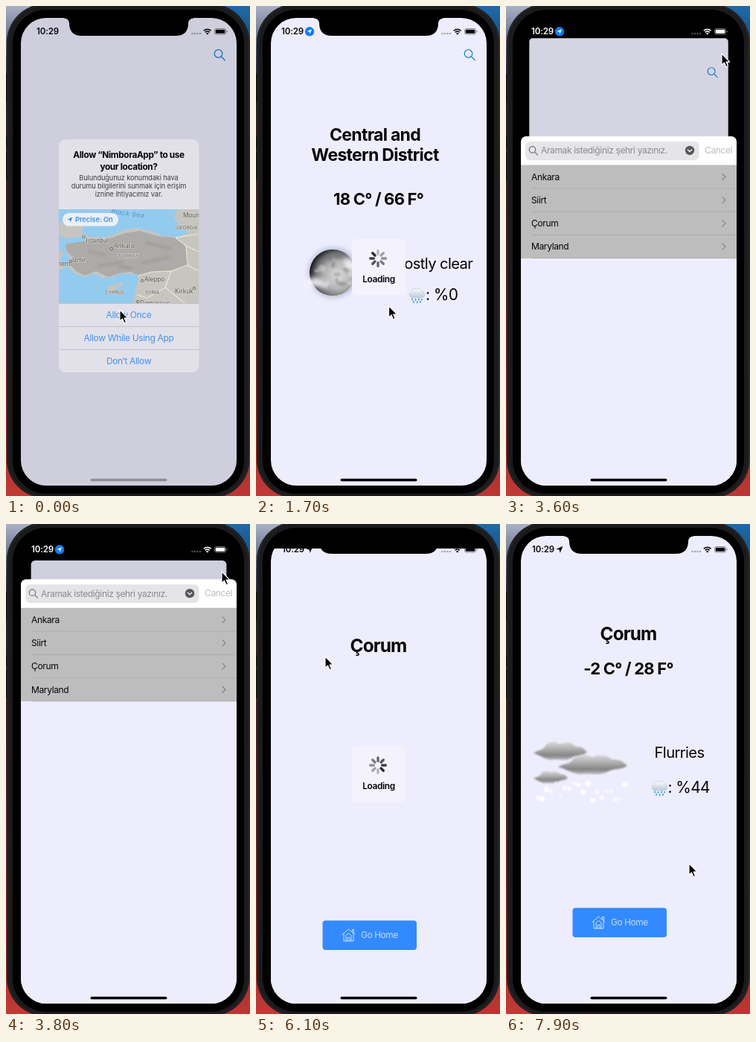
An HTML page for the animation above (8 s loop, 328x658 px).

```html
<!DOCTYPE html>
<html lang="en">
<head>
<meta charset="utf-8">
<title>Weather app</title>
<style>
  html, body { margin: 0; width: 100%; height: 100%; overflow: hidden; background: #000; }
  svg { display: block; }
  text { font-family: Inter, Roboto, sans-serif; letter-spacing: -.03em; fill: #050507; }
  .mid { text-anchor: middle; }
  .bold { font-weight: 700; letter-spacing: -.035em; }
  .t12 { font-size: 12px; }
  .t20 { font-size: 20.2px; }
  .msg { font-size: 9.2px; letter-spacing: -.01em; fill: #3c3b42; }
  .act { font-size: 12px; fill: #4292ee; }
  .map text { font-size: 8.3px; fill: #55544f; letter-spacing: -.01em; paint-order: stroke; stroke: #dcdbd5; stroke-width: 1.2px; }
  .map .land { font-size: 6.4px; fill: #7c7a76; font-weight: 600; }
  .line { fill: none; stroke-linecap: round; stroke-linejoin: round; }
</style>
</head>
<body>
<svg width="328" height="658" viewBox="0 0 328 658">
  <defs>
    <linearGradient id="desk" x2="0" y2="1">
      <stop offset="0" stop-color="#a9b1c6"/><stop offset=".1" stop-color="#46506a"/>
      <stop offset=".16" stop-color="#26222a"/><stop offset=".35" stop-color="#4a2423"/>
      <stop offset=".8" stop-color="#8e2b2a"/><stop offset="1" stop-color="#c23a36"/>
    </linearGradient>
    <linearGradient id="deskR" x2="0" y2="1">
      <stop offset="0" stop-color="#1f6aa8"/><stop offset=".12" stop-color="#163c63"/>
      <stop offset=".5" stop-color="#2a2027"/><stop offset="1" stop-color="#bd3633"/>
    </linearGradient>
    <radialGradient id="moon" cx=".62" cy=".56" r=".62">
      <stop offset="0" stop-color="#dedede"/><stop offset=".5" stop-color="#b0b0b1"/>
      <stop offset=".8" stop-color="#6a6a6d"/><stop offset="1" stop-color="#1d1d20"/>
    </radialGradient>
    <linearGradient id="grey" x2="0" y2="1">
      <stop offset="0" stop-color="#dcdcdf"/><stop offset=".45" stop-color="#aaa9a9"/>
      <stop offset=".75" stop-color="#858483"/><stop offset="1" stop-color="#bdbcc0"/>
    </linearGradient>
    <linearGradient id="rainSky" x2="0" y2="1">
      <stop offset="0" stop-color="#fbfdff"/><stop offset="1" stop-color="#bccbd8"/>
    </linearGradient>
    <filter id="soft1" x="-20%" y="-30%" width="140%" height="160%"><feGaussianBlur stdDeviation="1"/></filter>
    <filter id="soft3" x="-40%" y="-40%" width="180%" height="180%"><feGaussianBlur stdDeviation="3"/></filter>
    <clipPath id="screen"><rect x="20" y="16" width="290" height="628" rx="34"/></clipPath>
    <clipPath id="mapBox"><rect x="71" y="273" width="188.500" height="126"/></clipPath>
    <clipPath id="disc"><circle cx="103" cy="358" r="31"/></clipPath>
    <path id="puff" d="M0 24C8 18 14 20 20 14C26 2 40 0 50 8C58 2 72 4 78 12C90 10 96 18 100 22C92 30 80 26 72 32C60 40 46 34 36 36C24 38 14 28 0 24Z"/>
    <g id="lens" class="line"><circle r="5.300"/><path d="M4 4L8.700 8.700"/></g>
    <path id="plane" d="M4.500 -4.500L-4.600 -.6L-.2 .2L.6 4.600Z"/>
    <g id="rain">
      <path d="M4 13.500A4.500 4.500 0 0 1 3.800 5.200A5 5 0 0 1 11 2.200A5 5 0 0 1 18.500 5.600A4 4 0 0 1 18 13.500Z" fill="url(#rainSky)" stroke="#b5c3d0" stroke-width=".6"/>
      <path d="M5 15v1.500M9.500 15.500v1.500M14 15v1.500M18 15.500v1M7 18.500v1.500M11.800 19v1.500M16 18.500v1.500" class="line" stroke="#3d9fe0" stroke-width="1.700"/>
    </g>
  </defs>

  <rect width="164" height="658" fill="url(#desk)"/>
  <rect x="164" width="164" height="658" fill="url(#deskR)"/>
  <rect x="1" y="-3" width="326.500" height="664" rx="52" fill="#1b1b1d"/>
  <rect x="2.500" y="-1.500" width="323.500" height="661" rx="51" fill="none" stroke="#2b2b2e"/>
  <rect x="9" y="5" width="311" height="650" rx="45" fill="#000"/>
  <path d="M0 91h2v38h-2zM0 176h2v16h-2zM0 196h2v38h-2z" fill="#141416"/>

  <g clip-path="url(#screen)">
    <rect x="20" y="16" width="290" height="628" fill="#000"/>

    <g id="home">
      <rect id="homeBg" x="20" y="16" width="290" height="640" fill="#eeedfd"/>
      <use href="#lens" x="285.500" y="64" stroke="#1583de" stroke-width="1.300"/>
      <g id="place" class="bold" font-size="23">
        <text class="mid" x="160" y="181">Central and</text>
        <text class="mid" x="160" y="208">Western District</text>
      </g>
      <g id="homeData">
        <text class="mid bold" x="164.500" y="267" font-size="22">18 C° / 66 F°</text>
        <circle cx="104" cy="358" r="34" fill="#8b95b5" opacity=".5" filter="url(#soft3)"/>
        <circle cx="103" cy="358" r="31" fill="url(#moon)"/>
        <g clip-path="url(#disc)"><g id="craters" filter="url(#soft1)"></g></g>
        <g fill="#f6f6fb" filter="url(#soft3)" opacity=".9">
          <ellipse cx="78" cy="371" rx="13" ry="6"/><ellipse cx="134" cy="350" rx="12" ry="6"/>
          <ellipse cx="124" cy="344" rx="7" ry="5"/><ellipse cx="92" cy="374" rx="8" ry="4"/>
        </g>
        <text class="mid t20" x="236.500" y="352.500">Mostly clear</text>
        <use href="#rain" x="205" y="378"/>
        <text x="228" y="395" font-size="21">: %0</text>
      </g>
    </g>
    <rect id="dim" x="20" y="16" width="290" height="628" fill="#000"/>

    <g id="alert">
      <rect x="71" y="179" width="188.500" height="313" rx="9" fill="#e2e1ea"/>
      <g class="bold mid" font-size="11.800" fill="#111">
        <text x="165" y="204.300">Allow “NimboraApp” to use</text>
        <text x="165" y="219.500">your location?</text>
      </g>
      <text class="mid msg" x="165" y="234">Bulunduğunuz konumdaki hava</text>
      <text class="mid msg" x="165" y="245">durumu bilgilerini sunmak için erişim</text>
      <text class="mid msg" x="165" y="256">iznine ihtiyacımız var.</text>
      <g class="map" clip-path="url(#mapBox)">
        <rect x="71" y="273" width="189" height="126" fill="#c6c5bf"/>
        <path d="M71 273H230L226 283L232 296L246 304L232 310L212 309L194 302L176 298L160 300L148 306L130 311L112 310L102 304L104 296L95 288L71 292Z" fill="#93cbef"/>
        <path d="M71 309L84 312L103 309L110 314L98 318L84 319L80 330L87 340L83 350L92 359L106 364L118 359L130 365L144 364L154 359L168 360L175 357L178 368L174 380L171 399H71Z" fill="#93cbef"/>
        <path d="M80 320L90 318L112 315L134 314L160 305L180 302L204 309L228 311L242 322L244 348L222 356L196 357L178 362L168 357L152 359L138 364L121 356L106 362L94 356L85 346L90 338L82 330Z" fill="#adaba8"/>
        <path d="M134 378L146 374L158 371L153 378L140 383ZM71 326L78 332L73 340L79 352L71 356Z" fill="#c6c5bf"/>
        <path d="M178 362L196 357L222 356L244 348L259 356M244 348L242 322L228 311L259 306M242 322L259 330M222 356L214 378L190 392L176 388M214 378L240 399" class="line" stroke="#efecd6" stroke-width="1.200" stroke-dasharray="3 1.500"/>
        <path d="M112 329l20 5M126 349l30 -5M184 345l36 -8M190 318l30 8M152 350l16 2" class="line" stroke="#98968f" stroke-width="5" opacity=".45" filter="url(#soft1)"/>
        <text x="141" y="281" transform="rotate(8 160 281)" style="fill:#4e8fbf;stroke:none;font-style:italic;letter-spacing:.08em">Black Sea</text>
        <text x="238" y="284">Mount</text>
        <text x="229" y="300" class="land">GEORGIA</text>
        <text x="107.500" y="318">Istanbul</text><text x="145" y="325">Ankara</text>
        <text x="150" y="338" class="land" style="letter-spacing:.08em">TURKEY</text>
        <text x="89" y="344">Izmir</text><text x="61" y="349">Athens</text>
        <text x="186" y="370">Aleppo</text><text x="227" y="386">Kirkuk</text>
        <text x="133" y="387" class="land">CYPRUS</text><text x="187" y="387" class="land">SYRIA</text>
        <text x="180" y="402">Damascus</text>
        <g fill="#fff" stroke="#55544f"><circle cx="104.500" cy="310" r="1.500"/><circle cx="142" cy="326" r="1.500"/><circle cx="87" cy="343" r="1.500"/><circle cx="183" cy="369" r="1.500"/><circle cx="253" cy="379" r="1.500"/><circle cx="177" cy="397" r="1.500"/></g>
        <rect x="76" y="278" width="75" height="17.500" rx="8.700" fill="#ecf0f5"/>
        <use href="#plane" transform="translate(86 287) scale(.75)" fill="#2f86ea"/>
        <text x="93" y="290.200" style="font-size:9.300px;font-weight:600;fill:#3f8fea;stroke:none">Precise: On</text>
      </g>
      <path d="M71 399.500h188.500M71 430.500h188.500M71 461.500h188.500" stroke="#c3c2cc"/>
      <text class="mid act" x="165" y="418.700">Allow Once</text>
      <text class="mid act" x="165" y="450">Allow While Using App</text>
      <text class="mid act" x="165" y="481.300">Don’t Allow</text>
    </g>

    <g id="sheet">
      <rect x="20" width="290" height="660" rx="7" fill="#fff"/>
      <rect x="26" y="7" width="233.500" height="25" rx="6.500" fill="#e5e5e7"/>
      <use href="#lens" transform="translate(35.500 18) scale(.8)" stroke="#77777b" stroke-width="1.600"/>
      <text class="t12" x="47" y="23.500" style="fill:#89898d">Aramak istediğiniz şehri yazınız.</text>
      <circle cx="247" cy="19" r="6.200" fill="#58585c"/>
      <path d="M244.300 18l2.700 2.600l2.700 -2.600" class="line" stroke="#fff" stroke-width="1.300"/>
      <text class="t12" x="267" y="23.300" style="fill:#bcbcbf">Cancel</text>
      <rect x="20" y="38.500" width="290" height="126" fill="#bdbdbe"/>
      <rect x="20" y="164" width="290" height="500" fill="#eeedfd"/>
      <g id="rows"></g>
    </g>

    <g id="detail">
      <rect x="20" y="16" width="290" height="628" fill="#eeedfd"/>
      <text class="mid bold" x="164.500" y="155.500" font-size="24.300">Çorum</text>
      <g id="detailData">
        <text class="mid bold" x="164.500" y="202" font-size="22">-2 C° / 28 F°</text>
        <g fill="url(#grey)" filter="url(#soft1)">
          <use href="#puff" transform="translate(37 290) scale(.72 .74)"/>
          <use href="#puff" transform="translate(70 307) scale(.93 .8)"/>
          <use href="#puff" transform="translate(37 330) scale(.46 .5)"/>
        </g>
        <g id="snow" fill="#fff" filter="url(#soft1)"></g>
        <text class="mid t20" x="233" y="314">Flurries</text>
        <use href="#rain" x="195" y="344"/>
        <text x="217.500" y="361" font-size="21">: %44</text>
      </g>
      <rect x="89.500" y="515.500" width="126.500" height="39.500" rx="4" fill="#338aff"/>
      <path d="M116 534.500L124.500 527L133 534.500M118 533.500V543H131V533.500M129.500 531V527.500H131.500V532.500M121 543V535.500L124.500 532.500L128 535.500V543M123 543V538.500H126V543" class="line" stroke="#c9e0ff"/>
      <text x="141" y="539.300" font-size="11.800" style="fill:#c3dcff">Go Home</text>
    </g>

    <g id="hud">
      <rect x="129" y="313" width="72" height="75" rx="5" fill="#f3f2fd"/>
      <g id="spokes" class="line" stroke="#2b2b30" stroke-width="3.400"></g>
      <text class="mid" x="165" y="371.300" font-size="11.900" font-weight="600">Loading</text>
    </g>
    <rect id="bar" x="113.500" y="634.800" width="103" height="3.400" rx="1.700"/>
  </g>

  <path d="M78 14H252V16.500Q245.500 17 245 23Q245 40 228 40H102Q85 40 85 23Q84.500 17 78 16.500Z"/>

  <g id="status" fill="currentColor">
    <text id="clock" y="38.300" font-size="11.500" font-weight="600" style="fill:currentColor;letter-spacing:-.01em">10:29</text>
    <g id="pin"><circle cx="72" cy="34.300" r="6.200" fill="#147af3"/><use href="#plane" transform="translate(71.800 34.500) scale(.72)" fill="#fff"/></g>
    <use id="arrow" href="#plane" x="72" y="34.300"/>
    <g opacity=".3"><circle cx="250.500" cy="37" r="1.300"/><circle cx="254" cy="37" r="1.300"/><circle cx="257.500" cy="37" r="1.300"/><circle cx="261" cy="37" r="1.300"/></g>
    <path d="M265.800 33.200A7 7 0 0 1 275.600 33.200M267.800 35.300A4.200 4.200 0 0 1 273.600 35.300" fill="none" stroke="currentColor" stroke-width="1.600"/>
    <path d="M270.700 38.600L268.900 36.900A2.600 2.600 0 0 1 272.500 36.900Z"/>
    <rect x="280.500" y="30.500" width="15" height="7.500" rx="2.200" fill="none" stroke="currentColor" stroke-opacity=".45"/>
    <rect x="281.700" y="31.700" width="12.600" height="5.100" rx="1.200"/>
    <path d="M296.700 33v2.600q1.200 -.3 1.200 -1.300t-1.200 -1.300" opacity=".5"/>
  </g>

  <path id="cursor" d="M0 0V15.200L3.500 12L6 17.800L8.500 16.700L6 11.100H10.800Z" fill="#000" stroke="#fff" stroke-width="1.100" stroke-linejoin="round"/>
</svg>
<script>
const LOOP = 8000, STEP = 100;
const $ = id => document.getElementById(id);
const show = (id, on) => $(id).style.display = on ? '' : 'none';
const clamp = v => Math.min(1, Math.max(0, v));
const easeOut = v => 1 - (1 - clamp(v)) ** 3;
const easeBoth = v => v * v * (3 - 2 * v);

// time, x, y of the pointer tip
const POINTER = [
  [0, 153, 408], [99, 153, 408], [100, 159, 463], [1400, 159, 463],
  [2600, 284, 78], [2700, 284, 78], [3100, 290, 64], [4000, 290, 64],
  [4900, 93, 180], [5400, 93, 180], [5500, 93, 178], [6600, 93, 178],
  [7800, 246, 456], [LOOP, 246, 456]
];

function pointerAt(t) {
  const i = Math.max(1, POINTER.findIndex(k => k[0] > t));
  const [a, b] = [POINTER[i - 1], POINTER[i]];
  const p = easeBoth((t - a[0]) / (b[0] - a[0]));
  return [1, 2].map(n => a[n] + (b[n] - a[n]) * p);
}

let seed = 11;
const rand = () => (seed = seed * 16807 % 2147483647) / 2147483647;
const repeat = (n, make) => Array.from({ length: n }, (_, i) => make(i)).join('');

$('rows').innerHTML = ['Ankara', 'Siirt', 'Çorum', 'Maryland'].map((name, i) => {
  const y = 54.5 + i * 31.2;
  return `<text class="t12" x="34" y="${y + 4.3}">${name}</text>
    <path d="M291 ${y - 4}l4 4l-4 4" class="line" stroke="#848487" stroke-width="1.2"/>
    <path d="M34 ${y + 15.5}H310" stroke="#a9a9ab" stroke-width=".8"/>`;
}).join('');

$('craters').innerHTML = repeat(16, i =>
  `<ellipse cx="${82 + rand() * 46}" cy="${334 + rand() * 48}" rx="${2 + rand() * 5}" ry="${2 + rand() * 3}"
    fill="${i % 3 ? '#6d6d70' : '#f0f0f0'}" opacity=".4"/>`);

$('snow').innerHTML = repeat(20, i =>
  `<circle cx="${42 + i * 6.2}" cy="${346 + rand() * 25}" r="${1.4 + rand() * 2.4}"/>`);

$('spokes').innerHTML = repeat(8, i =>
  `<path d="M164 333.300v-4.600" transform="rotate(${i * 45} 164 339)"/>`);
const spokes = [...$('spokes').children];

function draw(t) {
  const rise = easeOut((t - 3300) / 714);
  const push = easeOut((t - 5600) / 714);
  const asking = t < 100, onDetail = t > 5600;

  show('alert', asking);
  show('place', t >= 900);
  show('homeData', t >= 1700);
  $('home').setAttribute('transform',
    `translate(${20 + 14 * rise} ${16 + 34 * rise}) scale(${1 - .0966 * rise}) translate(-20 -16)`);
  $('homeBg').setAttribute('rx', 6 * rise);
  $('dim').setAttribute('opacity', asking ? .13 : .13 * rise);

  show('sheet', rise > 0);
  $('sheet').setAttribute('transform', `translate(0 ${658 - 600 * rise})`);
  show('detail', onDetail);
  show('detailData', t >= 6300);
  $('detail').setAttribute('transform', `translate(0 ${628 * (1 - push)})`);

  const hud = onDetail
    ? clamp((t - 5800) / 200) * clamp((6500 - t) / 300)
    : t >= 900 ? clamp((2000 - t) / 300) : 0;
  show('hud', hud > 0);
  $('hud').setAttribute('opacity', hud);
  $('hud').setAttribute('transform', `translate(0 ${onDetail ? -15 : 0})`);
  const lead = 7 + (t - 900) / STEP;
  spokes.forEach((s, i) => s.setAttribute('opacity', 1 - .1 * (((lead - i) % 8 + 8) % 8)));

  const light = t >= 3500 && t < 6000;
  $('status').style.color = light ? '#fff' : '#08080a';
  $('clock').setAttribute('x', asking ? 41 : t < 4600 ? 34 : 35);
  show('pin', !asking && t < 4600);
  show('arrow', t >= 4600);
  $('bar').setAttribute('fill', asking ? '#908f99' : '#000');
  $('cursor').setAttribute('transform', `translate(${pointerAt(t).join(' ')})`);
}

const start = performance.now();
function tick() {
  const t = (performance.now() - start) % LOOP;
  draw(Math.floor(t / STEP) * STEP);
  requestAnimationFrame(tick);
}
tick();
</script>
</body>
</html>
```
